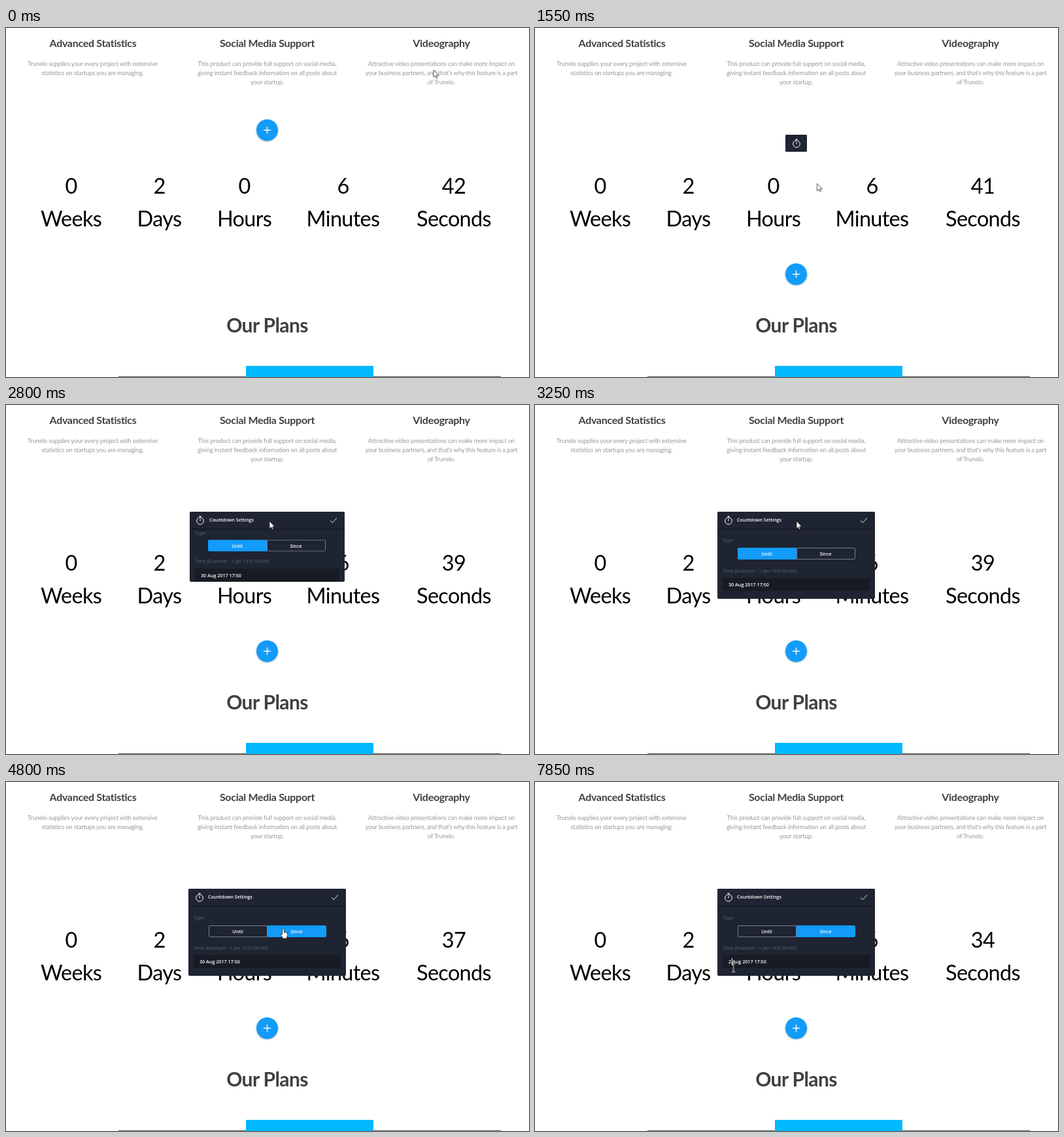
Write an HTML page that moves like this. It is 800 px wide and 533 px high and loops after 8000 ms.

```html
<!DOCTYPE html>
<html lang="en">
<head>
<meta charset="utf-8">
<title>Countdown settings</title>
<style>
  :root { --blue: #129bf8; --navy: #1f2432; --out: cubic-bezier(.333, 1, .667, 1); }
  html, body { margin: 0; width: 100%; height: 100%; overflow: hidden; background: #fff; }
  .stage { position: relative; width: 800px; height: 533px; overflow: hidden; }
  .layer { position: absolute; left: 0; top: 0; }

  /* page */
  .page text { font-family: Lato, "Open Sans", sans-serif; text-anchor: middle; }
  .page .head { font-size: 16px; font-weight: 700; letter-spacing: -.3px; fill: #404040; }
  .page .copy { font-size: 9.5px; letter-spacing: -.18px; fill: #999; }
  .page .big { font-size: 32.5px; letter-spacing: -.7px; fill: #000; }
  .page .plans { font-size: 30px; font-weight: 700; letter-spacing: -.6px; fill: #404040; }
  .count { animation: count 8s infinite; }
  .add { animation: add 8s infinite; filter: drop-shadow(0 1px 1px rgba(0, 0, 0, .25)); }

  @keyframes count {
    0% { transform: translateY(0); animation-timing-function: step-end; }
    10% { transform: translateY(-40px); animation-timing-function: steps(7, end); }
    97.5%, 100% { transform: translateY(-320px); }
  }
  @keyframes add {
    0%, 9.4% { transform: translate(399.5px, 156px) scale(1); }
    11.9% { transform: translate(399.5px, 156px) scale(0); }
    12% { transform: translate(399.5px, 376px) scale(0); }
    15.5%, 100% { transform: translate(399.5px, 376px) scale(1); }
  }

  /* settings panel */
  .panel {
    position: absolute; top: 163px; overflow: hidden; border-radius: 2px;
    background: var(--navy); color: #fff;
    font: 600 7.2px/10px "Open Sans", "Noto Sans", sans-serif; white-space: pre;
    animation: show 8s infinite, wide 8s var(--out) infinite, tall 8s var(--out) infinite;
  }
  .panel > *, .input > *, .top > * { position: absolute; }
  .top { left: 0; right: 0; top: 0; height: 26px; background: var(--navy); border-bottom: 1px solid #0e121a; }
  .watch { left: 8.5px; top: 5px; }
  .title { left: 30px; top: 8px; font-size: 7px; }
  .check { right: 11px; top: 8px; }
  .late { animation: late 8s infinite; }
  .row { animation: rise 8s var(--out) infinite; }
  .label { left: 8px; font-weight: 400; color: #5c6370; }
  .type { top: 39px; --from: -46px; --rest: -1px; }
  .time { top: 85px; --from: -58px; --rest: -.5px; }
  .toggle { left: 50%; top: 56px; width: 180px; height: 18px; margin-left: -90px; display: flex; --from: -51px; --rest: -1px; }
  .toggle span { box-sizing: border-box; width: 90px; border: 1px solid; line-height: 16px; text-align: center; }
  .until { border-radius: 2px 0 0 2px; animation: off 8s step-end infinite; }
  .since { border-radius: 0 2px 2px 0; animation: on 8s step-end infinite; }
  .input { left: 8px; right: 8px; top: 101px; height: 20px; background: #171b23; --from: -58px; --rest: 0px; }
  .date { left: 9px; top: 5px; }
  .old { animation: old 8s step-end infinite; }
  .new { animation: new 8s step-end infinite; }
  .mark { top: 4px; height: 12px; background: #2f7fd6; animation: mark 8s infinite; }
  .caret { top: 5px; width: 1px; height: 11px; background: #fff; }
  .c1 { left: 18px; animation: caret 8s step-end infinite; }
  .c2 { left: 14px; animation: new 8s step-end infinite; }

  @keyframes show { 0%, 10% { opacity: 0; } 12.5%, 100% { opacity: 1; } }
  @keyframes wide {
    0%, 29.69% { left: 383px; width: 33px; }
    36.94%, 100% { left: 279px; width: 241px; }
  }
  @keyframes tall { 0%, 32.31% { height: 26px; } 39.56%, 100% { height: 133px; } }
  @keyframes late { 0%, 29.7% { opacity: 0; } 32.5%, 100% { opacity: 1; } }
  @keyframes rise {
    0%, 32.31% { transform: translateY(var(--from)); }
    39.56%, 42.49% { transform: translateY(var(--rest)); }
    42.5%, 100% { transform: none; }
  }
  @keyframes off {
    0% { background: var(--blue); border-color: var(--blue); }
    60%, 100% { background: transparent; border-color: #757c88; }
  }
  @keyframes on {
    0% { background: transparent; border-color: #757c88; }
    60%, 100% { background: var(--blue); border-color: var(--blue); }
  }
  @keyframes old { 0% { opacity: 1; } 97.5%, 100% { opacity: 0; } }
  @keyframes new { 0% { opacity: 0; } 97.5%, 100% { opacity: 1; } }
  @keyframes caret { 0% { opacity: 0; } 78.125% { opacity: 1; } 82.5%, 100% { opacity: 0; } }
  @keyframes mark {
    0%, 82% { left: 18px; width: 0; }
    85%, 97.49% { left: 9px; width: 9px; }
    97.5%, 100% { left: 9px; width: 0; }
  }

  /* pointer */
  .pointer { animation: move 8s ease-in-out infinite; }
  .glyph { fill: #fff; stroke: #222; stroke-width: .8; stroke-linejoin: round; }
  .arrow { animation: arrow 8s step-end infinite; }
  .hand { animation: hand 8s step-end infinite; }
  .beam { fill: none; stroke: #dcdcdc; stroke-width: 1; animation: beam 8s step-end infinite; }

  @keyframes move {
    0%, 4.375% { transform: translate(654px, 64px); }
    7.5%, 9.375% { transform: translate(491.5px, 277px); }
    19.375%, 20% { transform: translate(431.5px, 237.5px); }
    25%, 27.5% { transform: translate(401px, 172px); }
    30%, 38.125% { transform: translate(403px, 177.5px); }
    40.625%, 44.375% { transform: translate(400px, 177.5px); }
    49.4% { transform: translate(395px, 198px); }
    54.375%, 55% { transform: translate(415px, 224px); }
    56.875%, 65.625% { transform: translate(424px, 224px); }
    75%, 78.125% { transform: translate(305.5px, 272px); }
    79.375%, 81.875% { transform: translate(305.5px, 273px); }
    85.625%, 87.5% { transform: translate(293.5px, 273px); }
    89.375%, 100% { transform: translate(303.5px, 284px); }
  }
  @keyframes arrow {
    0% { opacity: 1; } 24% { opacity: 0; } 30% { opacity: 1; } 53% { opacity: 0; }
    69% { opacity: 1; } 72%, 100% { opacity: 0; }
  }
  @keyframes hand {
    0% { opacity: 0; } 24% { opacity: 1; } 30% { opacity: 0; } 53% { opacity: 1; } 69%, 100% { opacity: 0; }
  }
  @keyframes beam { 0% { opacity: 0; } 72%, 100% { opacity: 1; } }
</style>
</head>
<body>
<div class="stage">
  <svg class="layer page" width="800" height="533" viewBox="0 0 800 533">
    <g class="head">
      <text x="133" y="29">Advanced Statistics</text>
      <text x="399.5" y="29">Social Media Support</text>
      <text x="666" y="29">Videography</text>
    </g>
    <g class="copy">
      <text x="132.5" y="57.5">Trunelo supplies your every project with extensive</text>
      <text x="132.5" y="71.5">statistics on startups you are managing.</text>
      <text x="399.5" y="57.5">This product can provide full support on social media,</text>
      <text x="399.5" y="71.5">giving instant feedback information on all posts about</text>
      <text x="399.5" y="85.5">your startup.</text>
      <text x="666" y="57.5">Attractive video presentations can make more impact on</text>
      <text x="666" y="71.5">your business partners, and that's why this feature is a part</text>
      <text x="666" y="85.5">of Trunelo.</text>
    </g>
    <g class="big">
      <text x="99.5" y="253">0</text>
      <text x="234.5" y="253">2</text>
      <text x="364.5" y="253">0</text>
      <text x="515.5" y="253">6</text>
      <svg x="640" y="220" width="90" height="40">
        <text class="count" y="33"><tspan x="45">42</tspan><tspan x="45" dy="40">41</tspan><tspan x="45" dy="40">40</tspan><tspan x="45" dy="40">39</tspan><tspan x="45" dy="40">38</tspan><tspan x="45" dy="40">37</tspan><tspan x="45" dy="40">36</tspan><tspan x="45" dy="40">35</tspan><tspan x="45" dy="40">34</tspan></text>
      </svg>
      <text x="99.5" y="303">Weeks</text>
      <text x="234.5" y="303">Days</text>
      <text x="364.5" y="303">Hours</text>
      <text x="515.5" y="303">Minutes</text>
      <text x="685" y="303">Seconds</text>
    </g>
    <text class="plans" x="399.5" y="465">Our Plans</text>
    <path d="M172 532.5H757" stroke="#555"/>
    <path d="M367 516h195v17H367z" fill="#00b8ff"/>
    <g class="add">
      <circle r="16.6" fill="#129bf8"/>
      <path d="M-5.5 0H5.5M0-5.5V5.5" stroke="#fff" stroke-width="1.4"/>
    </g>
  </svg>

  <div class="panel">
    <div class="row label type">Type:</div>
    <div class="row toggle"><span class="until">Until</span><span class="since">Since</span></div>
    <div class="row label time">Time (Example - 1 Jan 1970 00:00):</div>
    <div class="row input">
      <i class="mark"></i>
      <span class="date old">30 Aug 2017 17:50</span>
      <span class="date new">2 Aug 2017 17:50</span>
      <i class="caret c1"></i><i class="caret c2"></i>
    </div>
    <div class="top">
      <svg class="watch" width="16" height="16" fill="none" stroke="#fff">
        <circle cx="8" cy="9" r="5.3"/><path d="M8 2V4M6.5 2H9.5M8 5.5V9.5"/>
      </svg>
      <span class="title late">Countdown Settings</span>
      <svg class="check late" width="12" height="11" fill="none" stroke="#949aa4" stroke-width="1.2">
        <path d="M1 5.5L4.2 8.7L11 1.5"/>
      </svg>
    </div>
  </div>

  <svg class="layer" width="800" height="533" viewBox="0 0 800 533">
    <g class="pointer">
      <path class="glyph arrow" d="M0 0V11.3L2.6 8.9L4.3 12.6L6 11.9L4.4 8.2H8Z"/>
      <path class="glyph hand" d="M-1.3 1Q0-1 1.3 1V5.5L3.2 5.6L5 6.1L6.6 7V10.5L5.4 13V15H-1V13.2L-4 9Q-3.6 7.3-1.3 9Z"/>
      <path class="beam" d="M-2.5-6H2.5M0-6V6M-2.5 6H2.5"/>
    </g>
  </svg>
</div>
</body>
</html>
```
